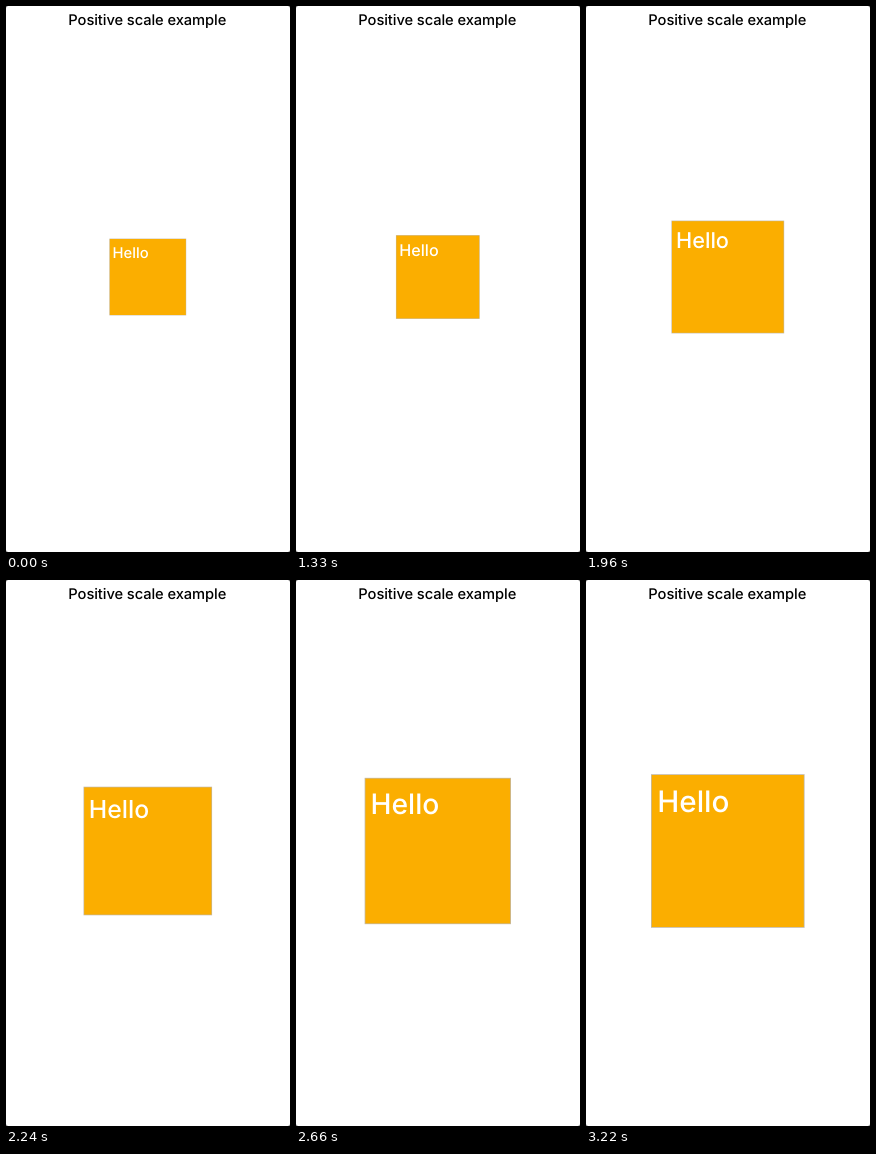
An HTML page that plays this animation: 284 by 546 pixels, repeating every 3290 ms.

```html
<!DOCTYPE html>
<html lang="en">
<head>
<meta charset="utf-8">
<title>Positive scale example</title>
<style>
  html, body { margin: 0; width: 100%; height: 100%; overflow: hidden; background: #fff; }
  svg { display: block; width: 284px; height: 546px; }
  text { font-family: Inter, "Liberation Sans", sans-serif; font-weight: 500; text-rendering: geometricPrecision; }
  .title { font-size: 14.7px; letter-spacing: -0.08px; text-anchor: middle; fill: #000; }
  .label { font-size: 14.8px; fill: #fff; }
</style>
</head>
<body>
<svg viewBox="0 0 284 546">
  <rect width="284" height="546" fill="#666"/>
  <rect width="284" height="546" rx="2.5" fill="#fff"/>
  <text class="title" x="141.3" y="19">Positive scale example</text>
  <g id="box">
    <rect x="-38.4" y="-38.4" width="76.8" height="76.8" fill="#c3b9a6"/>
    <rect x="-38" y="-38" width="76" height="76" fill="#fbae00"/>
    <text class="label" x="-35.3" y="-19.5">Hello</text>
  </g>
</svg>
<script>
  const LOOP = 3290, STEP = 70, START = 950, DURATION = 2100;
  const box = document.getElementById("box");

  // Cubic bezier (0.42, 0, 1, 1), solved for x by bisection.
  function easeIn(x) {
    let lo = 0, hi = 1;
    for (let i = 0; i < 30; i++) {
      const u = (lo + hi) / 2;
      if (1.26 * u + 0.48 * u * u - 0.74 * u ** 3 < x) lo = u; else hi = u;
    }
    return 3 * lo * lo - 2 * lo ** 3;
  }

  const easeInOut = p => p < 0.5 ? easeIn(2 * p) / 2 : 1 - easeIn(2 - 2 * p) / 2;

  function draw(now) {
    const time = Math.floor((now % LOOP) / STEP) * STEP;
    const p = Math.min(1, Math.max(0, (time - START) / DURATION));
    box.setAttribute("transform", `translate(141.8 271) scale(${1 + easeInOut(p)})`);
  }

  const origin = performance.now();
  function tick() {
    draw(performance.now() - origin);
    requestAnimationFrame(tick);
  }
  tick();
</script>
</body>
</html>
```
